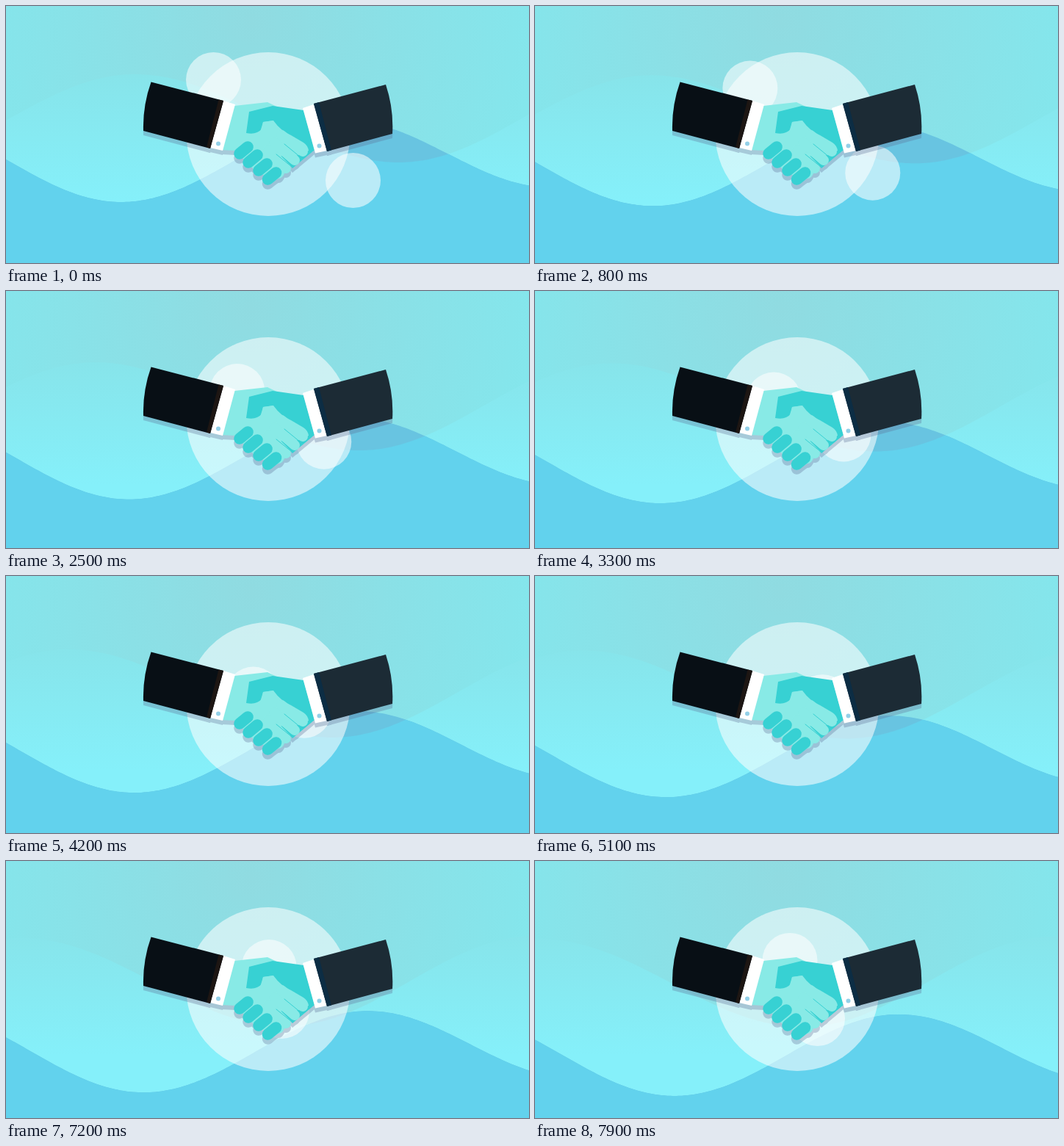
An HTML page for the animation above (8000 ms loop, 712 by 350 pixels).

```html
<!DOCTYPE html>
<html lang="en">
<head>
<meta charset="utf-8">
<title>Handshake</title>
<style>
  html, body { margin: 0; width: 100%; height: 100%; overflow: hidden; }
  svg { display: block; width: 100vw; height: 100vh; }
  #shake { filter: drop-shadow(0 6px 0 rgba(90, 110, 150, .32)); }
  .line { fill: none; stroke-linecap: round; }
</style>
</head>
<body>
<svg viewBox="0 0 712 350">
  <defs>
    <radialGradient id="sky" gradientUnits="userSpaceOnUse" cx="335" cy="20" r="390">
      <stop offset="0" stop-color="#90dbe1"/>
      <stop offset="1" stop-color="#84e6ec"/>
    </radialGradient>
    <linearGradient id="foam" gradientUnits="userSpaceOnUse" x1="0" y1="95" x2="0" y2="265">
      <stop offset="0" stop-color="#87e4ea"/>
      <stop offset="1" stop-color="#85f0fa"/>
    </linearGradient>
    <clipPath id="inLight"><path class="light"/></clipPath>
  </defs>

  <rect width="712" height="350" fill="url(#sky)"/>
  <path class="light" fill="url(#foam)"/>
  <path class="deep" fill="#68c4e1"/>
  <g clip-path="url(#inLight)"><path class="deep" fill="#62d2ed"/></g>

  <g fill="#fff" fill-opacity=".56">
    <circle cx="357" cy="174.5" r="111.5"/>
    <circle id="a" r="37.5"/>
    <circle id="b" r="37.5"/>
  </g>

  <g id="shake">
    <!-- left hand, then the right hand over it -->
    <path fill="#88eae6" d="M311 136L356 131L375 140L400 190L378 230L366 238L340 225L312 197L294 196Z"/>
    <path fill="#37d1d3" d="M331 144L363 136L405 142L420 196L390 221L370 200L364 156L350 158Q349 170 342 172Q336 175 327 173Z"/>
    <path fill="#88eae6" d="M350 158L364 156Q374 170 388 176L405 186Q411 190 412 197L400 203L360 205L345 175Z"/>
    <path class="line" stroke="#88eae6" stroke-width="14" d="M375 176L404 198M365 186L393 210M357 197L381 221M352 208L371 228"/>
    <path class="line" stroke="#37d1d3" d="M379 188L401 206M368 202L389 219"/>
    <path class="line" stroke="#37d1d3" stroke-width="15.6" d="M318 201L329 192M330 213L342 203M344 224L355 215M356.5 236L367.5 227"/>

    <!-- sleeves and cuffs -->
    <path fill="#fff" d="M296 129L312 134L295 197L278 193Z"/>
    <path fill="#080f15" d="M197.500 103.500L296 129L278 194L187 170Q186 136 197.500 103.500Z"/>
    <path fill="#1d1613" d="M289.500 127.500L296 129L278 194L273 192.500Z"/>
    <circle cx="289" cy="187.500" r="3" fill="#93d0e8"/>
    <path fill="#fff" d="M404 139L419 134L437 197L421 200.500Z"/>
    <path fill="#1c2b35" d="M419 133L517 107Q528 140 526 174L437 198Z"/>
    <path fill="#0c2d44" d="M419 133L426 131L443 196.500L437 198Z"/>
    <circle cx="426.500" cy="190.500" r="3" fill="#93d0e8"/>
  </g>
</svg>
<script>
  const LOOP = 8000, STEP = 100;
  // Crests and troughs at the start of the loop, joined by half cosines.
  const light = [[-165, 213], [175, 93], [535, 213], [875, 90], [1215, 213]];
  const deep = [[-148, 156], [157, 267], [462, 156], [742, 247]];

  function height(knots, x) {
    const i = knots.findIndex(k => k[0] > x);
    const [x0, y0] = knots[i - 1], [x1, y1] = knots[i];
    return y0 + (y1 - y0) * (1 - Math.cos(Math.PI * (x - x0) / (x1 - x0))) / 2;
  }

  function drawWave(name, knots, dx, dy) {
    let d = 'M0 350';
    for (let x = 0; x <= 712; x += 4) d += `L${x} ${(height(knots, x - dx) + dy).toFixed(2)}`;
    document.querySelectorAll('.' + name).forEach(p => p.setAttribute('d', d + 'V350Z'));
  }

  function place(id, x, y) {
    const c = document.getElementById(id);
    c.setAttribute('cx', x);
    c.setAttribute('cy', y);
  }

  function draw(now) {
    const s = Math.floor(now % LOOP / STEP) * STEP / 1000;
    drawWave('light', light, -21.5 * s, 1.65 * s);
    drawWave('deep', deep, 4.2 * s, 6.7 * s);
    place('a', 282.5 + 12.91 * s, 100.5 + 14.43 * s);
    place('b', 472.5 - 15.89 * s, 237.5 - 12.91 * s);
  }

  let start;
  function tick(now) {
    start ??= now;
    draw(now - start);
    requestAnimationFrame(tick);
  }
  draw(0);
  requestAnimationFrame(tick);
</script>
</body>
</html>
```
